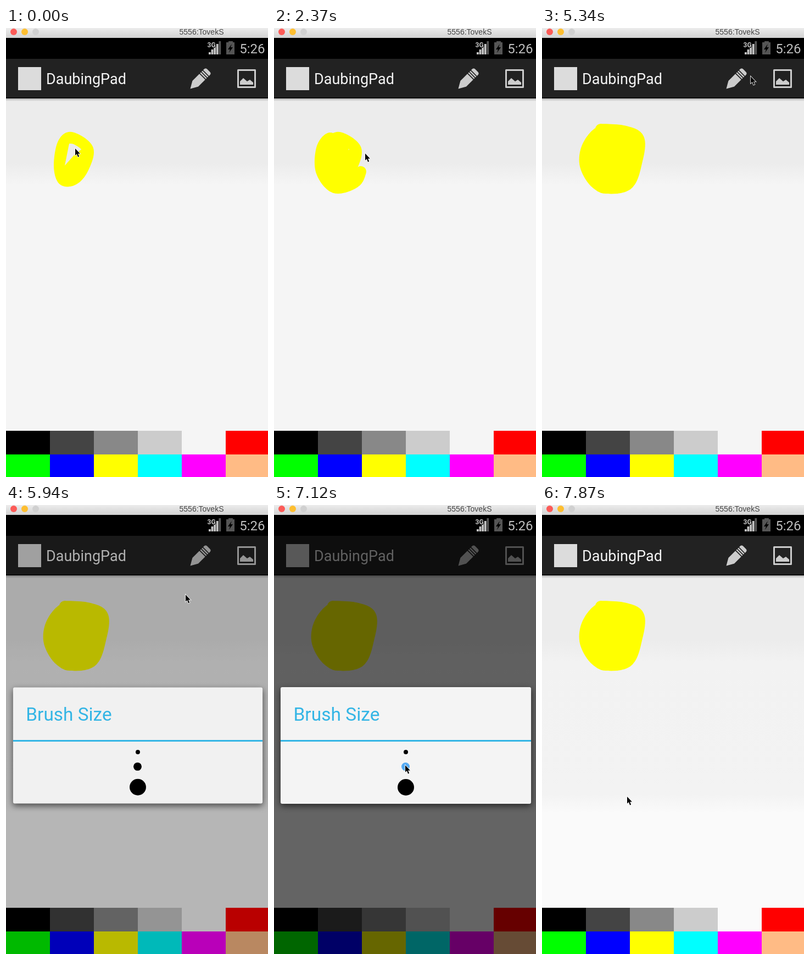
An HTML page with a canvas for the animation above (8000 ms loop, 477 by 816 pixels).

```html
<!DOCTYPE html>
<html lang="en">
<head>
<meta charset="utf-8">
<title>Finger painting</title>
<style>
html, body { margin: 0; width: 100%; height: 100%; overflow: hidden; background: #000; }
canvas { display: block; }
</style>
</head>
<body>
<canvas id="stage" width="477" height="816"></canvas>
<script>
const ctx = document.getElementById('stage').getContext('2d');
const W = 477, H = 816, LOOP = 8000, STEP = 148.5, LAST = 53;
const YELLOW = '#ffff00', ACCENT = '#33b5e5', ICON = '#cccccc', BAR = '#222222';

// Spline knots: the first ring, then a scribble inside it and two growing laps
const RING = [[119, 199], [103, 212], [97, 250], [104, 276], [124, 275], [141, 254], [149, 220]];
const HOLE = [[115, 210], [131, 211], [138, 220], [125, 230], [107, 250]];
const BRUSH = [
  [126, 219], [119, 218], [118, 234], [111, 246], [113, 224],
  [103, 200], [87, 219], [86, 260], [110, 290], [145, 282], [158, 261],
  [166, 214], [140, 197], [107, 188], [82, 217], [80, 254], [107, 288],
  [155, 285], [173, 241], [176, 201], [148, 187], [107, 184]
];
const KNOT_STEPS = 1.5, DRAWN = 32;
const DIALOG_OPEN = 40, DIALOG_PRESS = 47, DIALOG_CLOSE = 51;

// Pointer stops after drawing: step, x, y
const STOPS = [
  [DRAWN, 117, 184], [36, 380, 88], [38, 356, 92], [DIALOG_OPEN, 327, 163],
  [DIALOG_PRESS, 239, 473], [50, 239, 473], [LAST, 155, 530]
];

const SWATCHES = ['#000', '#444', '#888', '#ccc', 'transparent', '#f00',
  '#0f0', '#00f', '#ff0', '#0ff', '#f0f', '#ffbb85'];

const clamp = (v, lo, hi) => Math.max(lo, Math.min(hi, v));

function rect(x, y, w, h, fill) {
  ctx.fillStyle = fill;
  ctx.fillRect(x, y, w, h);
}

function disc(x, y, r, fill) {
  ctx.fillStyle = fill;
  ctx.beginPath();
  ctx.arc(x, y, r, 0, Math.PI * 2);
  ctx.fill();
}

function text(str, x, y, font, fill, align = 'left') {
  ctx.font = font;
  ctx.fillStyle = fill;
  ctx.textAlign = align;
  ctx.fillText(str, x, y);
}

function trace(points, close = true) {
  points.forEach(([x, y], n) => n ? ctx.lineTo(x, y) : ctx.moveTo(x, y));
  if (close) ctx.closePath();
}

function shape(points, fill) {
  ctx.fillStyle = fill;
  ctx.beginPath();
  trace(points);
  ctx.fill();
}

function vertical(y0, y1, stops) {
  const g = ctx.createLinearGradient(0, y0, 0, y1);
  stops.forEach(([y, color]) => g.addColorStop((y - y0) / (y1 - y0), color));
  return g;
}

// Catmull-Rom position at knot number k
function spline(knots, k, closed = false) {
  const n = knots.length, i = Math.floor(k), u = k - i;
  const knot = j => knots[closed ? (j + n) % n : clamp(j, 0, n - 1)];
  const [a, b, c, d] = [-1, 0, 1, 2].map(o => knot(i + o));
  return [0, 1].map(m => b[m] + u / 2 * (c[m] - a[m]
    + u * (2 * a[m] - 5 * b[m] + 4 * c[m] - d[m]
    + u * (3 * (b[m] - c[m]) + d[m] - a[m]))));
}

function curve(knots, end, closed) {
  const count = Math.ceil(end * 10);
  return Array.from({ length: count + 1 }, (_, n) => spline(knots, end * n / Math.max(1, count), closed));
}

const brushKnot = s => clamp((s - 1) / KNOT_STEPS, 0, BRUSH.length - 1);

function pointerAt(s) {
  if (s < DRAWN) return spline(BRUSH, brushKnot(s + 1));
  const n = Math.max(1, STOPS.findIndex(stop => stop[0] >= s));
  const [s0, x0, y0] = STOPS[n - 1], [s1, x1, y1] = STOPS[n];
  const p = (s - s0) / (s1 - s0);
  return [x0 + (x1 - x0) * p, y0 + (y1 - y0) * p];
}

function drawWindowBar() {
  rect(0, 0, W, 18, vertical(0, 18, [[0, '#ececec'], [18, '#d2d2d2']]));
  ['#fc5b57', '#fdbe30', '#d0d0d0'].forEach((color, n) => disc(14 + n * 20, 7, 6, color));
  text('5556:TovekS', 356, 12, '14px "Liberation Sans", sans-serif', '#444', 'center');
}

function drawStatusBar() {
  rect(0, 18, W, 38, '#000');
  for (let n = 0; n < 5; n++) {
    const h = 4 + n * 5;
    rect(369 + n * 4.6, 48 - h, 3.8, h, n < 4 ? '#c4c4c4' : '#555');
  }
  rect(366, 24, 15, 12, '#000');
  text('3G', 366.5, 35, 'bold 12px Roboto, sans-serif', '#c4c4c4');
  rect(405, 24, 8, 3, '#555');
  rect(401, 26, 15, 22, '#555');
  shape([[411, 29], [404, 39], [408, 39], [406, 45], [413, 35], [409, 35]], '#000');
  text('5:26', 471.5, 46, '24px Roboto, sans-serif', '#bebebe', 'right');
}

function drawPencil() {
  ctx.save();
  ctx.translate(335.5, 110.5);
  ctx.rotate(-Math.PI / 4);
  shape([[0, 0], [13, -7.5], [40, -7.5], [40, 7.5], [13, 7.5]], ICON);
  ctx.beginPath();
  ctx.roundRect(40, -7.5, 7, 15, [0, 4, 4, 0]);
  ctx.fill();
  for (let n = 0; n < 3; n++) rect(31 + n * 4, -8, 1.7, 16, BAR);
  ctx.restore();
}

function drawActionBar() {
  rect(0, 56, W, 72, BAR);
  rect(0, 126, W, 2, '#0e0e0e');
  rect(22, 71, 42, 42, '#dcdcdc');
  text('DaubingPad', 73, 102, '27px Roboto, sans-serif', '#f3f3f3');
  drawPencil();
  ctx.strokeStyle = ICON;
  ctx.lineWidth = 3;
  ctx.strokeRect(422.5, 76.5, 31, 31);
  shape([[426, 103], [426, 97], [432, 91], [439, 97], [444, 94], [450, 99], [450, 103]], ICON);
}

function drawPaper(late) {
  const lower = late
    ? [[285, '#f2f2f2'], [525, '#f3f3f3'], [560, '#fafafa'], [H, '#fafafa']]
    : [[285, '#f5f5f5'], [H, '#f5f5f5']];
  rect(0, 128, W, H - 128, vertical(128, H, [[128, '#ececec'], [245, '#ececec'], ...lower]));
  rect(0, 128, W, 5, vertical(128, 133, [[128, 'rgba(0,0,0,.25)'], [133, 'rgba(0,0,0,0)']]));
}

function drawSwatches() {
  SWATCHES.forEach((color, n) => rect(n % 6 * 80, n < 6 ? 732 : 775, 80, 43, color));
}

function drawPaint(s) {
  ctx.fillStyle = ctx.strokeStyle = YELLOW;
  ctx.lineWidth = 20;
  ctx.lineCap = ctx.lineJoin = 'round';
  ctx.beginPath();
  trace(curve(RING, RING.length, true));
  ctx.stroke();
  trace(HOLE);
  ctx.fill('evenodd');
  if (s < 1) return;
  ctx.beginPath();
  trace(curve(BRUSH, brushKnot(s)), false);
  ctx.fill();
  ctx.stroke();
}

function drawDialog(opening, pressed) {
  rect(0, 56, W, H - 56, `rgba(0,0,0,${opening ? 0.275 : 0.6})`);
  const scale = opening ? 0.996 : 1;
  ctx.save();
  ctx.translate(240, 437);
  ctx.scale(scale, scale);
  ctx.translate(-240, -437);
  ctx.save();
  ctx.shadowColor = 'rgba(0,0,0,.6)';
  ctx.shadowBlur = 12;
  ctx.shadowOffsetY = 4;
  ctx.fillStyle = opening ? '#f1f1f1' : '#f4f4f4';
  ctx.beginPath();
  ctx.roundRect(12, 331, 456, 212, 3);
  ctx.fill();
  ctx.restore();
  text('Brush Size', 35.5, 392, '33.5px Roboto, sans-serif', ACCENT);
  rect(12, 427, 456, 3, ACCENT);
  disc(240, 449, 4, '#000');
  disc(239.5, 475.5, 7.5, pressed ? '#55aaf2' : '#000');
  disc(240, 513, 15, '#000');
  ctx.restore();
}

function drawPointer(s) {
  const [x, y] = pointerAt(s);
  ctx.save();
  ctx.translate(Math.round(x), Math.round(y));
  ctx.lineJoin = 'miter';
  ctx.lineWidth = 1.6;
  ctx.strokeStyle = '#fff';
  ctx.beginPath();
  trace([[0, 0], [0, 12.5], [3, 10], [5, 15.5], [7.2, 14.5], [5, 9.5], [9, 9.5]]);
  ctx.stroke();
  ctx.fillStyle = '#000';
  ctx.fill();
  ctx.restore();
}

function draw(ms) {
  const s = Math.min(LAST, Math.floor((ms + 10) / STEP));
  drawPaper(s >= DIALOG_OPEN);
  drawPaint(s);
  drawSwatches();
  drawWindowBar();
  drawStatusBar();
  drawActionBar();
  if (s >= DIALOG_OPEN && s < DIALOG_CLOSE) drawDialog(s === DIALOG_OPEN, s >= DIALOG_PRESS);
  drawPointer(s);
}

const start = performance.now();
function tick() {
  draw((performance.now() - start) % LOOP);
  requestAnimationFrame(tick);
}
tick();
</script>
</body>
</html>
```
